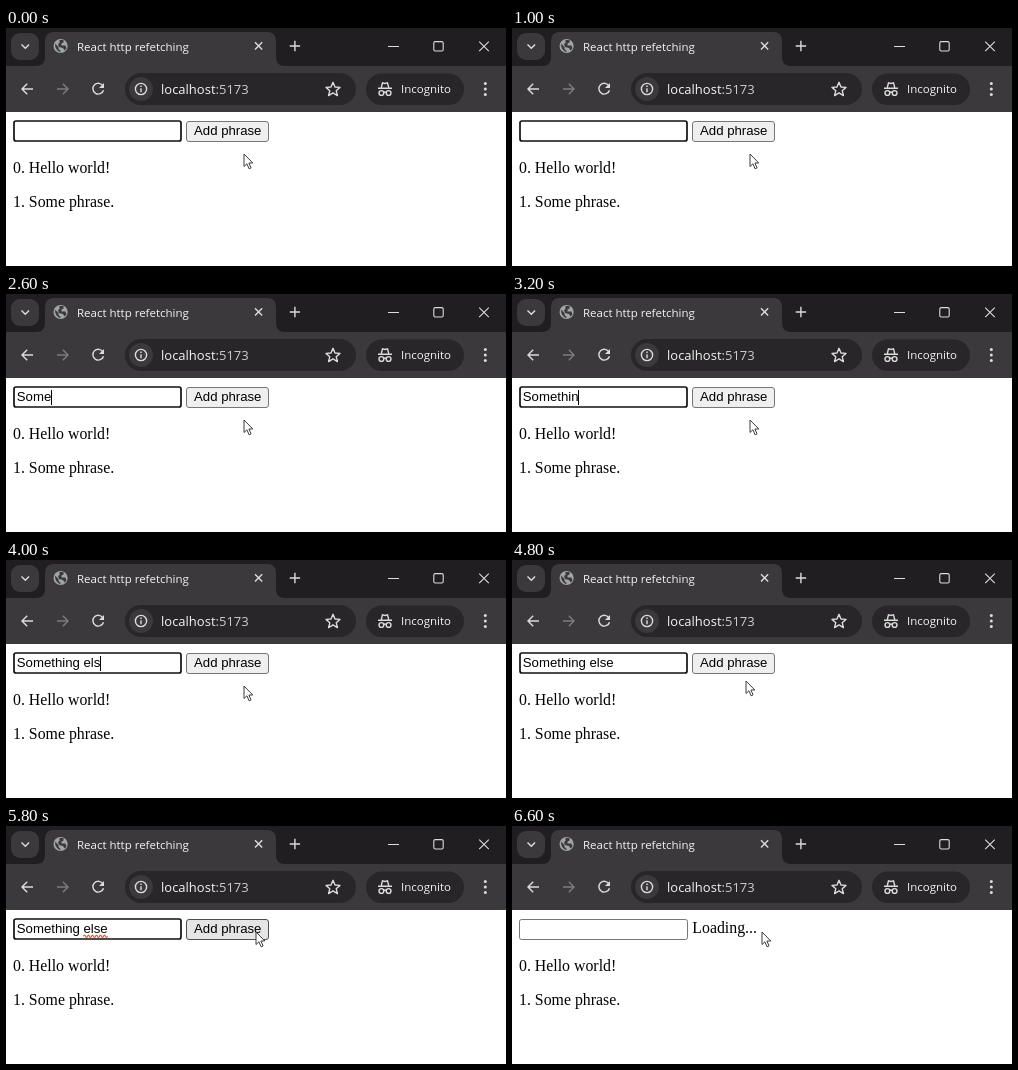
These frames come from a looping animation (500x238 px, 8 s). An HTML page:

```html
<!DOCTYPE html>
<html lang="en">
<head>
<meta charset="utf-8">
<title>React http refetching</title>
<style>
  html, body { margin: 0; width: 100%; height: 100%; overflow: hidden; background: #fff; }
  svg { display: block; width: 500px; height: 238px; }
  text { white-space: pre; }
  .ui { font: 11.5px "Open Sans", "Noto Sans", sans-serif; fill: #f4f4f4; }
  .url { font-size: 13px; }
  .page { font: 15.85px "Liberation Serif", "Times New Roman", serif; }
  .control { font: 13.2px "Liberation Sans", Arial, sans-serif; }
  .bar { fill: #3b393b; }
  .pill { fill: #282628; }
  .line { fill: none; stroke: #dcdcdc; stroke-width: 1.4; }
  #field { fill: #fff; stroke: #767676; }
  #field.focus { stroke: #101010; stroke-width: 1.7; }
  #button rect { fill: #efefef; stroke: #767676; }
  #button.hover rect { fill: #e5e5e5; stroke: #4f4f4f; }
  #button.active rect { fill: #f5f5f5; stroke: #8d8d8d; }
</style>
</head>
<body>
<svg viewBox="0 0 500 238">
  <rect width="500" height="238" fill="#fff"/>

  <!-- tab strip -->
  <rect width="500" height="39" fill="#201e20"/>
  <rect class="bar" x="5" y="5" width="28" height="27" rx="9"/>
  <path class="line" d="M15.5 16.5l3.8 3.8 3.8-3.8"/>
  <path class="bar" d="M30 38q9 0 9-9V13q0-9 9-9H261q9 0 9 9V29q0 9 9 9V39H30z"/>
  <circle cx="54.6" cy="18" r="7.1" fill="#a2a5a8"/>
  <path class="bar" d="M49 15.5l3.5 3.5v2l2 2v1.2q-5.5-1.5-5.5-8.7zM53.5 12h4v2.5l-2 1v2h4l1 3-2 2-1.5-2.5-4-1-1-3 1.5-1z"/>
  <text class="ui" x="71" y="23">React http refetching</text>
  <path class="line" d="M249 14.3l7.2 7.2m0-7.2l-7.2 7.2M283.7 18h10.4m-5.2-5.2v10.4"/>
  <path class="line" style="stroke-width:1.1" d="M382 18.5h11M473.2 13.6l9.6 9.6m0-9.6l-9.6 9.6"/>
  <rect class="line" style="stroke-width:1.1" x="427.8" y="13.6" width="9.4" height="9.4" rx="1.5"/>

  <!-- toolbar -->
  <rect class="bar" y="38" width="500" height="46"/>
  <path class="line" d="M27 61H16m5.2-5.2L16 61l5.2 5.2"/>
  <path class="line" style="stroke:#7d7d7d" d="M51 61h11m-5.2-5.2L62 61l-5.2 5.2"/>
  <path class="line" d="M97 58a5.4 5.4 0 1 0 .5 4.2"/>
  <path d="M98 55v5h-5z" fill="#dcdcdc"/>
  <rect class="pill" x="119" y="45" width="231" height="32" rx="16"/>
  <circle class="bar" cx="135" cy="61" r="12"/>
  <circle class="line" cx="135" cy="61" r="5.6"/>
  <path class="line" d="M135 60.2v4M135 57.5v1.5"/>
  <text class="ui url" x="155" y="66">localhost<tspan fill="#cfcfcf">:5173</tspan></text>
  <path class="line" stroke-linejoin="round" d="M327 54.3l2 4.7 5 .4-3.8 3.3 1.2 4.9-4.4-2.7-4.4 2.7 1.2-4.9-3.8-3.3 5-.4z"/>
  <rect class="pill" x="360" y="45.5" width="98" height="31.5" rx="15.7"/>
  <path class="line" d="M375.3 59.5l1.2-4.6 2.5.6 2.5-.6 1.2 4.6M372 60.2h14M377.8 64.4q1.2-.8 2.4 0"/>
  <circle class="line" cx="375.4" cy="65" r="2.4"/>
  <circle class="line" cx="382.6" cy="65" r="2.4"/>
  <text class="ui" x="395" y="65">Incognito</text>
  <g fill="#dcdcdc">
    <circle cx="479.3" cy="55.5" r="1.5"/><circle cx="479.3" cy="61" r="1.5"/><circle cx="479.3" cy="66.5" r="1.5"/>
  </g>

  <!-- page -->
  <rect id="field" rx="2"/>
  <text id="typed" class="control" x="10.8" y="107"></text>
  <rect id="caret" y="96" width="1" height="15"/>
  <path id="squiggle" fill="none" stroke="#d4553f" stroke-width="1.1"/>
  <g id="button">
    <rect x="180.5" y="93.5" width="82" height="20" rx="2.5"/>
    <text class="control" x="188" y="107">Add phrase</text>
  </g>
  <text id="loading" class="page" x="180.3" y="107">Loading...</text>
  <text class="page" x="7" y="145">0. Hello world!</text>
  <text class="page" x="7" y="179">1. Some phrase.</text>
  <path id="pointer" d="M.5.5V13l2.9-2.7 2.2 5 2-.9-2.2-4.9h3.9z" fill="#fff" stroke="#3a3a3a" stroke-linejoin="round"/>
</svg>
<script>
  const LOOP = 8000, PHRASE = "Something else";
  const CLICK = 6400, LOADING = 6600, HOVER = 5200, SPELLCHECK = 5000;

  // Each step is [start time, ...values] and holds until the next one.
  const typing = [[0, 0], [1800, 1], [2000, 2], [2400, 3], [2600, 4], [2800, 5], [3000, 6], [3200, 8],
    [3400, 9], [3600, 10], [3800, 11], [4000, 13], [4200, 14], [LOADING, 0]];
  const blinking = [[0, 0], [400, 1], [1000, 0], [1400, 1], [4800, 0], [5200, 1], [5800, 0]];
  const moving = [[0, 238, 126], [4800, 234, 121], [5000, 236, 115], [5200, 244, 109],
    [5400, 256, 106], [5600, 253, 106], [5800, 250, 106]];

  const $ = id => document.getElementById(id);
  const at = (steps, t) => steps.findLast(step => step[0] <= t).slice(1);
  const show = (id, on) => $(id).setAttribute("visibility", on ? "visible" : "hidden");
  const setAttrs = (id, attrs) => Object.entries(attrs).forEach(([k, v]) => $(id).setAttribute(k, v));

  $("squiggle").setAttribute("d", "M77.5 110.3" + "q1-2.4 2 0t2 0".repeat(6));

  function render(t) {
    const focused = t < CLICK, loading = t >= LOADING;
    const [length] = at(typing, t), [caretOn] = at(blinking, t), [x, y] = at(moving, t);

    $("typed").textContent = PHRASE.slice(0, length);
    const textWidth = length ? $("typed").getComputedTextLength() : 0;
    $("caret").setAttribute("x", Math.floor(11 + textWidth));
    show("caret", focused && caretOn);
    show("squiggle", t >= SPELLCHECK && !loading);

    $("field").setAttribute("class", focused ? "focus" : "");
    setAttrs("field", focused
      ? { x: 8, y: 93, width: 167, height: 20 }
      : { x: 7.5, y: 93.5, width: 168, height: 20 });

    $("button").setAttribute("class", t >= CLICK ? "active" : t >= HOVER ? "hover" : "");
    show("button", !loading);
    show("loading", loading);
    $("pointer").setAttribute("transform", `translate(${x - 0.5} ${y - 0.5})`);
  }

  const start = performance.now();
  function tick(now) {
    render(Math.max(0, now - start) % LOOP);
    requestAnimationFrame(tick);
  }
  render(0);
  requestAnimationFrame(tick);
</script>
</body>
</html>
```
